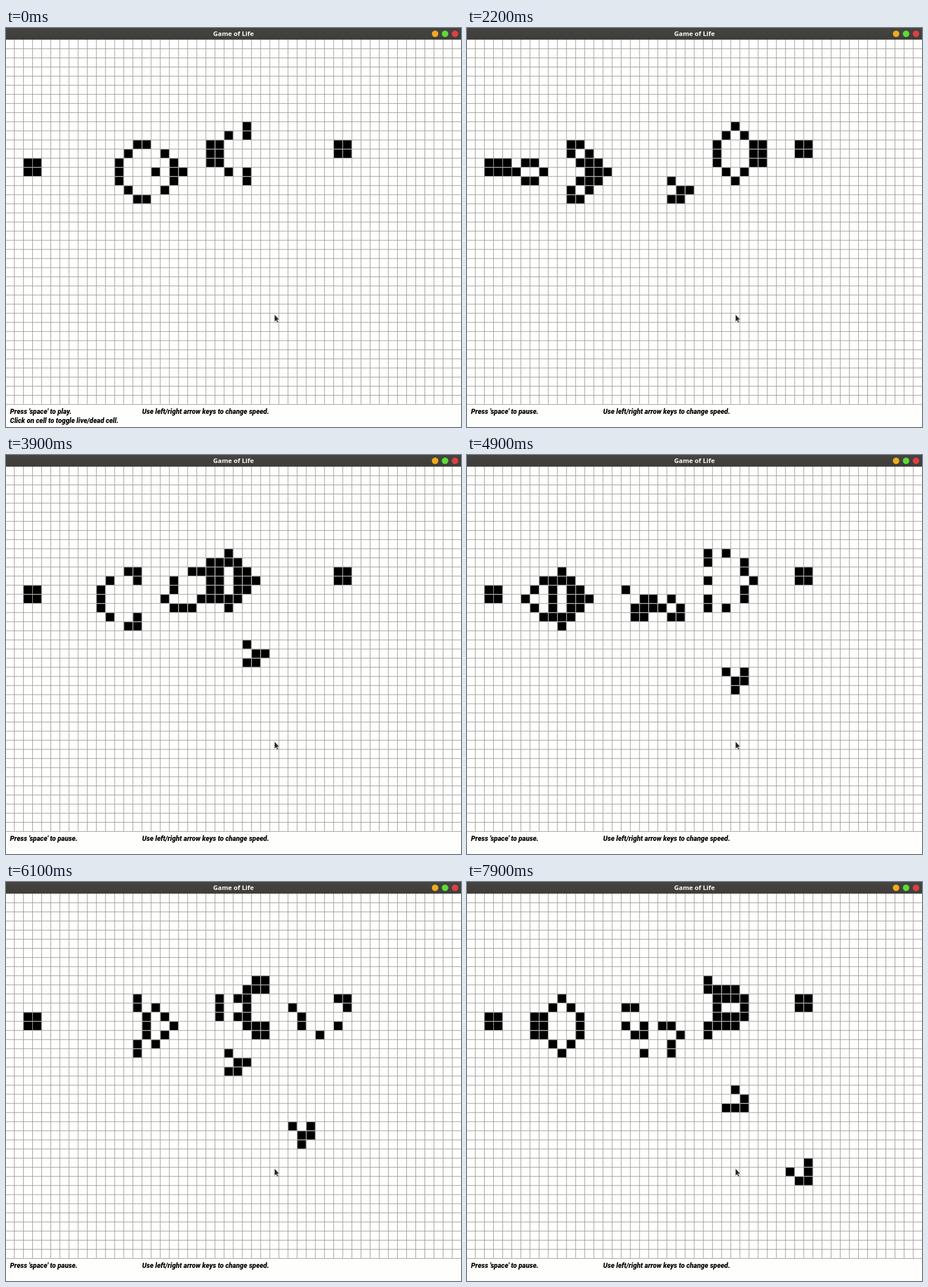
Animation, 799 px wide and 701 px high, one loop 8 s. Source, as an HTML page with a canvas:

```html
<!DOCTYPE html>
<html lang="en">
<head>
<meta charset="utf-8">
<title>Game of Life</title>
<style>
  html, body { margin: 0; width: 100%; height: 100%; overflow: hidden; background: #fefefd; }
  canvas, svg { position: absolute; left: 0; top: 0; display: block; }
  .title { font: 700 11.4px "Open Sans", "Noto Sans", sans-serif; fill: #fbfaf6; }
  .hint { font: italic 900 12px Roboto, Arial, sans-serif; fill: #000; }
</style>
</head>
<body>
<canvas id="board" width="799" height="701"></canvas>
<svg width="799" height="701" viewBox="0 0 799 701">
  <defs>
    <linearGradient id="bar" x2="0" y2="1">
      <stop offset="0" stop-color="#454440"/>
      <stop offset="1" stop-color="#3e3d39"/>
    </linearGradient>
  </defs>
  <rect width="799" height="20.5" fill="url(#bar)"/>
  <text class="title" x="399.5" y="14" text-anchor="middle">Game of Life</text>
  <circle cx="753.5" cy="10.3" r="5.7" fill="#eeab1c"/>
  <circle cx="771" cy="10.3" r="5.7" fill="#5bdb38"/>
  <circle cx="788.5" cy="10.3" r="5.7" fill="#dd4041"/>
  <text class="hint" id="play" x="7" y="678"></text>
  <text class="hint" x="239" y="678">Use left/right arrow keys to change speed.</text>
  <text class="hint" id="click" x="7" y="694">Click on cell to toggle live/dead cell.</text>
  <path d="M471.5 503.5v12.5l2.8-2.5 2 4.2 1.9-.9-2-4.1 3.6-.3z" fill="#262626" stroke="#d8d8d6" stroke-width=".6"/>
</svg>
<script>
const COLS = 50, ROWS = 40, PITCH = 16.022, LEFT = -2, TOP = 20;
const LOOP = 8000, TICK = 100, START = 2;

// Ticks at which the simulation stalls, and at which it catches up.
const STALLS = [9, 15, 19, 25, 35, 60, 62, 65];
const CATCHUPS = [16, 26, 61, 63];

const GUN = [
  "........................O",
  "......................O.O",
  "............OO......OO............OO",
  "...........O...O....OO............OO",
  "OO........O.....O...OO",
  "OO........O...O.OO....O.O",
  "..........O.....O.......O",
  "...........O...O",
  "............OO"
];

function seed() {
  const cells = new Uint8Array(COLS * ROWS);
  GUN.forEach((line, y) => [...line].forEach((ch, x) => {
    if (ch === "O") cells[(y + 9) * COLS + x + 2] = 1;
  }));
  return cells;
}

function evolve(cells) {
  const at = (x, y) => x >= 0 && y >= 0 && x < COLS && y < ROWS ? cells[y * COLS + x] : 0;
  return cells.map((alive, i) => {
    const x = i % COLS, y = Math.floor(i / COLS);
    let sum = -alive;
    for (let dy = -1; dy <= 1; dy++)
      for (let dx = -1; dx <= 1; dx++) sum += at(x + dx, y + dy);
    return sum === 3 || (alive && sum === 2) ? 1 : 0;
  });
}

const passed = (list, tick) => list.filter(t => t <= tick).length;
const generationAt = tick =>
  Math.max(0, tick - START - passed(STALLS, tick) + passed(CATCHUPS, tick));

const history = [seed()];
while (history.length <= generationAt(LOOP / TICK)) history.push(evolve(history.at(-1)));

const ctx = document.getElementById("board").getContext("2d");
const play = document.getElementById("play");
const click = document.getElementById("click");

const lineX = c => LEFT + c * PITCH;
const lineY = r => TOP + r * PITCH;

function drawBoard(cells) {
  ctx.fillStyle = "#fefefd";
  ctx.fillRect(0, 0, 799, 701);
  ctx.fillStyle = "#000";
  cells.forEach((alive, i) => {
    if (alive) ctx.fillRect(lineX(i % COLS) + 1, lineY(Math.floor(i / COLS)) + 1, PITCH - 1, PITCH - 1);
  });
  ctx.fillStyle = "#989896";
  for (let c = 1; c < COLS; c++) ctx.fillRect(lineX(c), TOP, 1, ROWS * PITCH);
  for (let r = 1; r <= ROWS; r++) ctx.fillRect(0, lineY(r), 799, 1);
}

let shown = -1;
function render(now) {
  const tick = Math.floor(now % LOOP / TICK);
  if (tick !== shown) {
    shown = tick;
    const running = tick >= START;
    drawBoard(history[generationAt(tick)]);
    play.textContent = `Press 'space' to ${running ? "pause" : "play"}.`;
    click.style.display = running ? "none" : "";
  }
}

const begin = performance.now();
function loop() {
  render(performance.now() - begin);
  requestAnimationFrame(loop);
}
loop();
</script>
</body>
</html>
```
